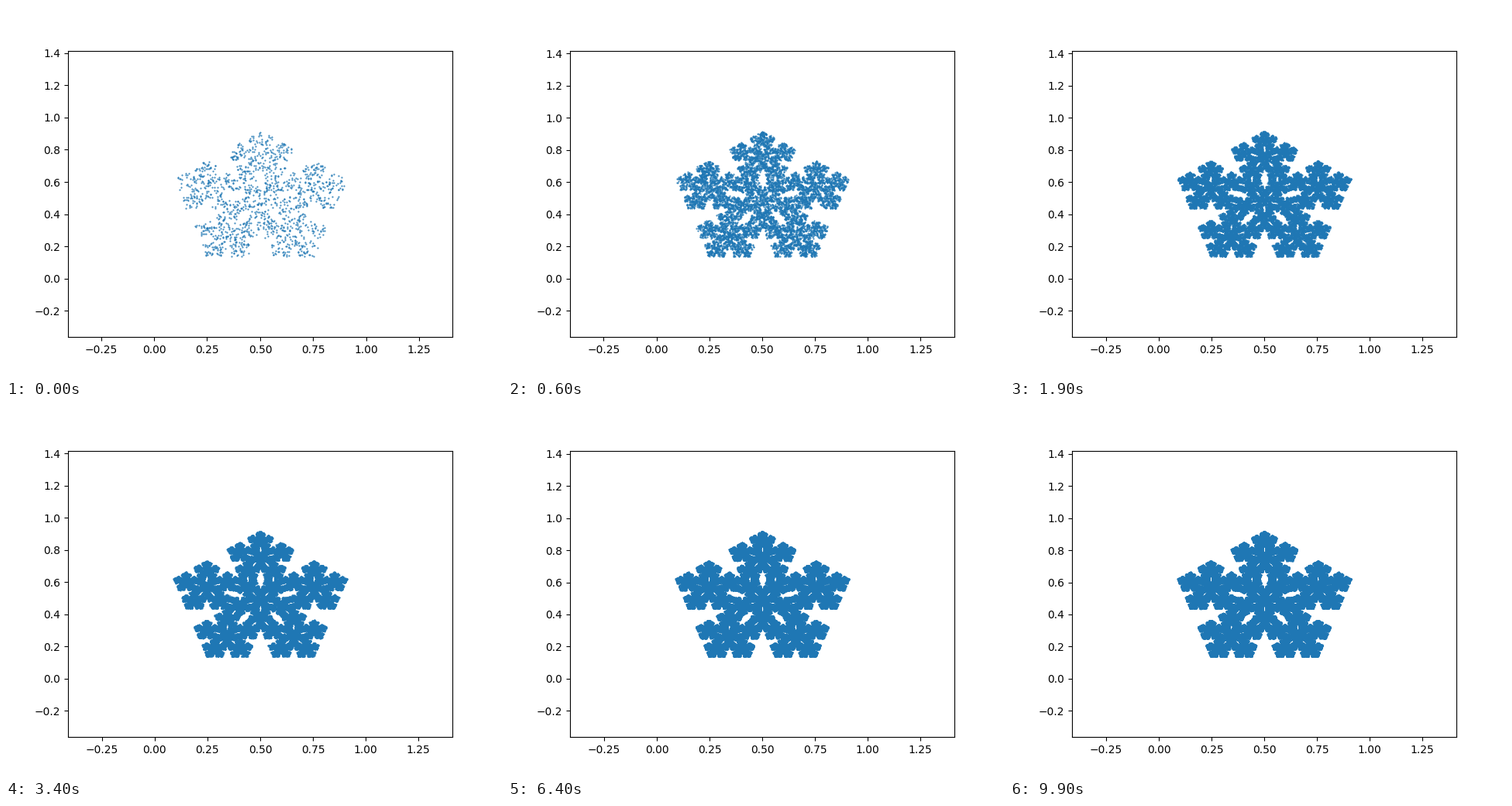
These frames come from a looping animation (640x480 px, 10000 ms). A matplotlib script:

```python
import numpy as np
import matplotlib.pyplot as plt
from matplotlib.animation import FuncAnimation

FRAMES, STEP = 100, 1500
RATIO = (3 - 5 ** 0.5) / 2
CENTER, RADIUS = 0.5 + 0.487j, 0.4325

# (first frame, xlim, ylim): the view widens as the tips fill in
VIEWS = [
    (0, (-0.4056, 1.4060), (-0.3630, 1.4154)),
    (3, (-0.4092, 1.4098), (-0.3635, 1.4178)),
    (15, (-0.4104, 1.4104), (-0.3635, 1.4180)),
    (60, (-0.4112, 1.4107), (-0.3635, 1.4198)),
]


def pentaflake(count, seed=5):
    """Chaos game: five corner copies and one flipped copy in the middle."""
    corners = 1j * np.exp(2j * np.pi * np.arange(5) / 5)
    maps = [(RATIO, (1 - RATIO) * complex(c)) for c in corners] + [(-RATIO, 0j)]
    picks = np.random.default_rng(seed).integers(0, 6, count + 20)
    z, points = 0j, []
    for k in picks.tolist():
        scale, shift = maps[k]
        z = scale * z + shift
        points.append(z)
    return CENTER + RADIUS * np.array(points[20:])


points = pentaflake(FRAMES * STEP)

fig, ax = plt.subplots(figsize=(6.4, 4.8), dpi=100)
dots, = ax.plot([], [], "o", color="tab:blue", markersize=0.5)


def update(frame):
    shown = points[:(frame + 1) * STEP]
    dots.set_data(shown.real, shown.imag)
    _, xlim, ylim = [v for v in VIEWS if v[0] <= frame][-1]
    ax.set_xlim(xlim)
    ax.set_ylim(ylim)
    return dots,


anim = FuncAnimation(fig, update, frames=FRAMES, interval=100,
                     init_func=lambda: update(0), repeat=True, repeat_delay=0)
plt.show()
```
